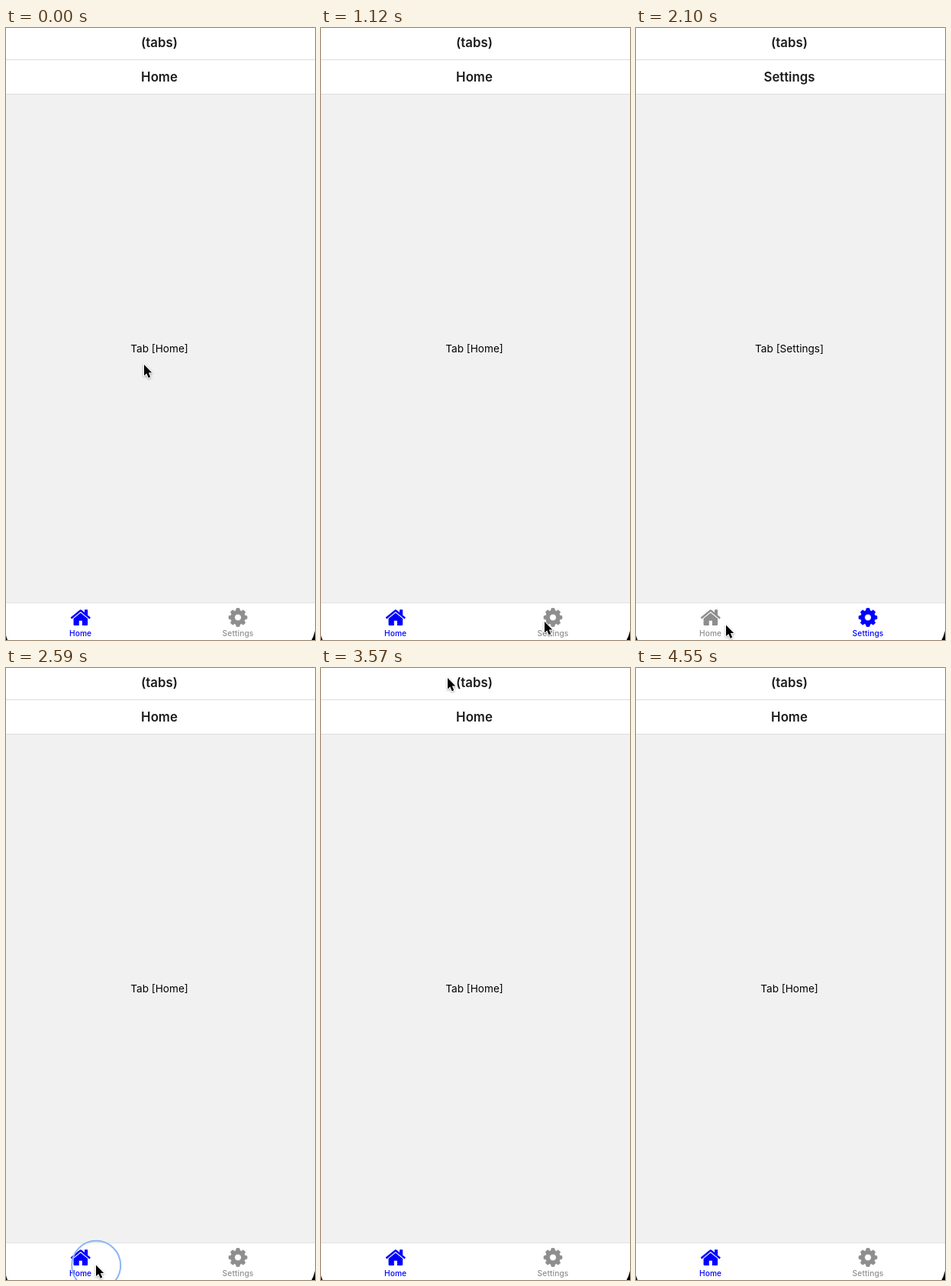
An HTML page with a canvas for the animation above (5250 ms loop, 405x800 px).

```html
<!DOCTYPE html>
<html lang="en">
<head>
<meta charset="utf-8">
<title>Tabs</title>
<style>
  html, body { margin: 0; width: 100%; height: 100%; overflow: hidden; background: #f1f1f1; }
  canvas { display: block; width: 405px; height: 800px; }
</style>
</head>
<body>
<canvas id="stage"></canvas>
<script>
(() => {
const W = 405, H = 800, LOOP = 5250, STEP = 70;
const BLUE = '#0000ff', GRAY = '#8e8e8f';
const canvas = document.getElementById('stage');
const ctx = canvas.getContext('2d');
const dpr = window.devicePixelRatio || 1;
canvas.width = W * dpr;
canvas.height = H * dpr;

const house = new Path2D(
  'M1408 992v480q0 26-19 45t-45 19h-384v-384h-256v384h-384q-26 0-45-19t-19-45v-486l576-474 576 474z' +
  'M1631 923l-62 74q-8 9-21 11h-3q-13 0-21-7l-692-577-692 577q-12 8-24 7-13-2-21-11l-62-74' +
  'q-8-10-7-23t11-22l719-599q32-26 76-26t76 26l244 204v-195q0-14 9-23t23-9h192q14 0 23 9t9 23v408' +
  'l219 182q10 8 11 22t-7 23z');

const arrow = new Path2D('M0 0V14.6L3.3 11.5L5.7 17.2L8.2 16.1L5.8 10.6H10.2Z');

const gear = makeGear();

function makeGear() {
  const path = new Path2D();
  for (let i = 0; i < 8; i++) {
    const a = i * Math.PI / 4, c = Math.cos(a), s = Math.sin(a);
    for (const [r, w] of [[8.9, -2.5], [11.8, -1.8], [11.8, 1.8], [8.9, 2.5]]) {
      path.lineTo(r * c - w * s, r * s + w * c);
    }
  }
  path.closePath();
  path.moveTo(4.5, 0);
  path.arc(0, 0, 4.5, 0, Math.PI * 2, true);
  return path;
}

// Cursor segments: start, end, from, control, to
const homeTab = [118, 780.5], settingsTab = [293, 776], header = [166, 13];
const moves = [
  [210, 700, [181, 440], [228, 640], settingsTab],
  [1820, 2100, settingsTab, [205, 778], homeTab],
  [2870, 3570, homeTab, [220, 380], header],
  [3570, 3710, header, [163, -2], [160, -30]]
];
const clicks = [[1470, settingsTab], [2380, homeTab]];

const clamp = v => Math.max(0, Math.min(1, v));
const ease = v => v * v * (3 - 2 * v);

function cursorAt(t) {
  let pos = moves[0][2];
  for (const [start, end, a, b, c] of moves) {
    if (t < start) break;
    const u = ease(clamp((t - start) / (end - start))), v = 1 - u;
    pos = a.map((p, i) => v * v * p + 2 * u * v * b[i] + u * u * c[i]);
  }
  return pos;
}

function rect(y, h, color) {
  ctx.fillStyle = color;
  ctx.fillRect(0, y, W, h);
}

function text(str, x, y, size, weight, color, spacing = 0) {
  ctx.font = `${weight} ${size}px Inter, sans-serif`;
  ctx.letterSpacing = spacing + 'px';
  ctx.textAlign = 'center';
  ctx.fillStyle = color;
  ctx.fillText(str, x, y);
}

function drawHouse(color) {
  ctx.save();
  ctx.translate(84.4, 756.2);
  ctx.scale(0.0161, 0.0161);
  ctx.fillStyle = color;
  ctx.fill(house);
  ctx.restore();
}

function drawGear(color) {
  ctx.save();
  ctx.translate(304, 770.5);
  ctx.fillStyle = ctx.strokeStyle = color;
  ctx.lineJoin = 'round';
  ctx.lineWidth = 1;
  ctx.fill(gear);
  ctx.stroke(gear);
  ctx.restore();
}

function drawCorners() {
  ctx.fillStyle = '#000';
  ctx.beginPath();
  ctx.moveTo(0, 794);
  ctx.quadraticCurveTo(0.8, 797.5, 2, H);
  ctx.lineTo(0, H);
  ctx.moveTo(W, 788);
  ctx.quadraticCurveTo(403.5, 795, 400.5, H);
  ctx.lineTo(W, H);
  ctx.fill();
}

function drawRing(t, [start, [x, y]]) {
  const age = t - start;
  if (age < 0 || age >= 420) return;
  const grow = ease(clamp((age + STEP) / 210));
  ctx.save();
  ctx.globalAlpha = grow * (1 - clamp((age - 210) / 210));
  ctx.strokeStyle = '#8ab6f4';
  ctx.lineWidth = 2;
  ctx.beginPath();
  ctx.arc(x + 0.2, y + 0.3, 20 + 12 * grow, 0, Math.PI * 2);
  ctx.stroke();
  ctx.restore();
}

function drawCursor([x, y]) {
  ctx.save();
  ctx.translate(x, y);
  ctx.lineJoin = 'round';
  ctx.lineWidth = 2;
  ctx.strokeStyle = '#fff';
  ctx.shadowColor = 'rgba(0,0,0,.35)';
  ctx.shadowBlur = 3 * dpr;
  ctx.shadowOffsetY = dpr;
  ctx.stroke(arrow);
  ctx.shadowColor = 'transparent';
  ctx.fillStyle = '#000';
  ctx.fill(arrow);
  ctx.restore();
}

function draw(t) {
  const onSettings = t >= 1610 && t < 2520;
  const name = onSettings ? 'Settings' : 'Home';
  const homeColor = onSettings ? GRAY : BLUE;
  const settingsColor = onSettings ? BLUE : GRAY;

  ctx.setTransform(dpr, 0, 0, dpr, 0, 0);
  rect(0, H, '#f1f1f1');
  rect(0, 86, '#fff');
  rect(41, 1, '#dcdcdc');
  rect(86, 1, '#dcdcdc');
  rect(751, 49, '#fff');
  rect(751, 1, '#e2e2e2');

  text('(tabs)', 201, 25, 16.8, 600, '#1c1c1e');
  text(name, 201, 70, 16.8, 600, '#1c1c1e');
  text(`Tab [${name}]`, 201, 423.5, 13.6, 400, '#000');

  drawHouse(homeColor);
  drawGear(settingsColor);
  text('Home', 97.6, 795, 10.2, 500, homeColor, 0.1);
  text('Settings', 304, 795, 10.2, 500, settingsColor, 0.1);
  drawCorners();

  clicks.forEach(click => drawRing(t, click));
  if (t < 3710) drawCursor(cursorAt(t));
}

const began = performance.now();

function tick() {
  const t = (performance.now() - began) % LOOP;
  draw(Math.floor(t / STEP) * STEP);
  requestAnimationFrame(tick);
}
tick();
})();
</script>
</body>
</html>
```
